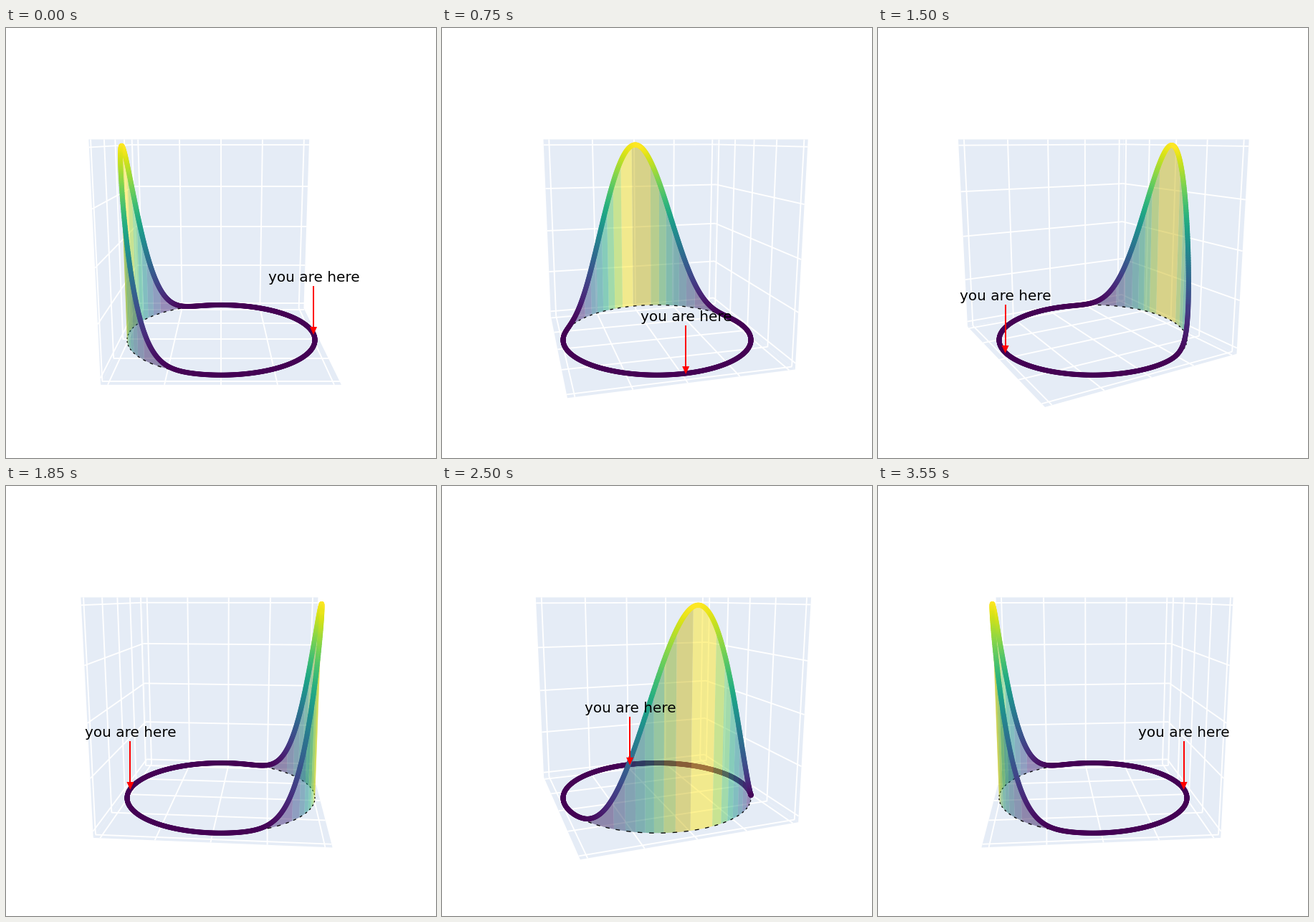
These frames come from a looping animation (600 by 600 pixels, 3600 ms). A matplotlib script:

```python
import numpy as np
import matplotlib.pyplot as plt
from matplotlib.animation import FuncAnimation
from matplotlib.collections import LineCollection, PolyCollection

SIZE, FRAMES, INTERVAL = 600, 72, 50
PX = 0.72                                  # points per pixel at 100 dpi
FOCAL = 300 / np.tan(np.pi / 8)
DIST, EYE_Z = 2.5, 0.5                     # camera distance and height
TILT = EYE_Z / DIST
NORM = np.hypot(1, TILT)
CX, CY = 300, 300.3
SCALE = 1 / 2.125                          # data unit inside the unit cube
TOP, FLOOR = -0.5 + 0.5 / 17, 0.5 - 0.5 / 17
TICKS = np.linspace(-SCALE, SCALE, 5)
VIRIDIS = plt.get_cmap("viridis")


def turn(x, y, a):
    """Rotate into camera-aligned axes: right and away."""
    return x * np.cos(a) + y * np.sin(a), y * np.cos(a) - x * np.sin(a)


def project(x, y, z, a):
    """Screen pixels of a scene point; z points down, -0.5 is the box top."""
    right, away = turn(np.asarray(x, float), np.asarray(y, float), a)
    drop = z + 0.5
    depth = away + DIST + TILT * drop
    sx = CX + FOCAL * NORM * right / depth
    sy = CY - FOCAL * TILT + FOCAL * NORM ** 2 * drop / depth
    return np.stack(np.broadcast_arrays(sx, sy), axis=-1)


def bump(theta):
    return np.clip(-np.cos(theta), 0, 1) ** 6


def ring(theta, a, raised=True):
    z = FLOOR - (FLOOR - TOP) * bump(theta) if raised else FLOOR
    return project(SCALE * np.cos(theta), SCALE * np.sin(theta), z, a)


def is_front(theta, a):
    """True where the outer side of the cylinder faces the camera."""
    away = turn(SCALE * np.cos(theta), SCALE * np.sin(theta), a)[1]
    return away < -SCALE ** 2 / DIST


# curve pieces
edge = np.linspace(0, 2 * np.pi, 721)
mid = (edge[1:] + edge[:-1]) / 2
curve_colors = VIRIDIS(bump(mid))

# curtain, coloured in steps of height
strip = np.radians(np.linspace(105, 255, 301))
strip_mid = (strip[1:] + strip[:-1]) / 2
level = np.floor((bump(strip_mid) + 0.1) / 0.125)

dash = np.radians(np.arange(108, 253, 6))
DASH_LEN = np.radians(2.4)

fig = plt.figure(figsize=(6, 6), dpi=100, facecolor="white")
ax = fig.add_axes([0, 0, 1, 1])
ax.set_xlim(0, SIZE)
ax.set_ylim(SIZE, 0)
ax.axis("off")


def lines(width, order, **kw):
    return ax.add_collection(
        LineCollection([], linewidths=width * PX, zorder=order, **kw),
        autolim=False)


def polys(order, **kw):
    return ax.add_collection(
        PolyCollection([], zorder=order, edgecolors="none", **kw),
        autolim=False)


walls = polys(1, facecolors="#E5ECF6")
grid = lines(1.9, 2, colors="white")
halves = []
for k in range(2):                         # far half, then near half
    base = 3 + 3 * k
    halves.append((polys(base),
                   lines(1.3, base + 1, colors="black", capstyle="butt"),
                   lines(7, base + 2, capstyle="round")))
stem, = ax.plot([], [], color="red", lw=2 * PX, solid_capstyle="butt", zorder=10)
head = polys(11, facecolors="red")
label = ax.text(0, 0, "you are here", fontsize=20 * PX, family="DejaVu Sans",
                color="black", ha="center", va="baseline", zorder=12)


def draw_box(a):
    # a hair of extra turn settles which wall shows when seen edge-on
    ends = turn(np.array([1, 0]), np.array([0, 1]), a + 1e-6)[1]
    wx, wy = 0.5 * np.sign(ends)
    faces = [
        lambda u, v: (u, v, 0.5 + 0 * u),
        lambda u, v: (wx + 0 * u, u, v),
        lambda u, v: (u, wy + 0 * u, v),
    ]
    u = np.array([-0.5, 0.5, 0.5, -0.5])
    v = np.array([-0.5, -0.5, 0.5, 0.5])
    span = np.array([-0.5, 0.5])
    quads, segs = [], []
    for face in faces:
        quads.append(project(*face(u, v), a))
        for t in TICKS:
            fixed = np.full(2, t)
            segs.append(project(*face(fixed, span), a))
            segs.append(project(*face(span, fixed), a))
    walls.set_verts(quads)
    grid.set_segments(segs)


def curtain(a):
    """Bands of one colour each, as (near, outline, rgba)."""
    front = is_front(strip_mid, a)
    side = turn(np.cos(strip_mid), np.sin(strip_mid), a)[0]
    lit = np.where(front, side, -side) > 0.3   # turned to the light on the right
    key = level * 4 + front * 2 + lit
    cuts = np.flatnonzero(np.diff(key)) + 1
    top, low = ring(strip, a), ring(strip, a, False)
    for i, j in zip([0, *cuts], [*cuts, len(key)]):
        outline = np.concatenate([top[i:j + 1], low[i:j + 1][::-1]])
        rgb = np.array(VIRIDIS(level[i] / 8)[:3]) * (1.0 if lit[i] else 0.8)
        yield front[i], outline, (*rgb, 0.5)


def draw_ring(a):
    pts = ring(edge, a)
    segs = np.stack([pts[:-1], pts[1:]], axis=1)
    dashes = np.stack([ring(dash + f * DASH_LEN, a, False)
                       for f in (0, 0.5, 1)], axis=1)
    bands = list(curtain(a))
    for near, (fill, foot, curve) in zip((False, True), halves):
        fill.set_verts([b[1] for b in bands if b[0] == near])
        fill.set_facecolor([b[2] for b in bands if b[0] == near])
        foot.set_segments(dashes[is_front(dash, a) == near])
        pick = is_front(mid, a) == near
        curve.set_segments(segs[pick])
        curve.set_color(curve_colors[pick])


def draw_note(a):
    x, y = ring(0.0, a, False)
    stem.set_data([x, x], [y - 66.5, y - 6])
    head.set_verts([[(x - 5, y - 9.8), (x + 5, y - 9.8), (x, y + 1.1)]])
    label.set_position((x + 0.5, y - 72.5))


def update(i):
    a = 2 * np.pi * i / FRAMES
    draw_box(a)
    draw_ring(a)
    draw_note(a)
    return []


anim = FuncAnimation(fig, update, frames=FRAMES, interval=INTERVAL,
                     repeat=True, repeat_delay=0, blit=False)
plt.show()
```
